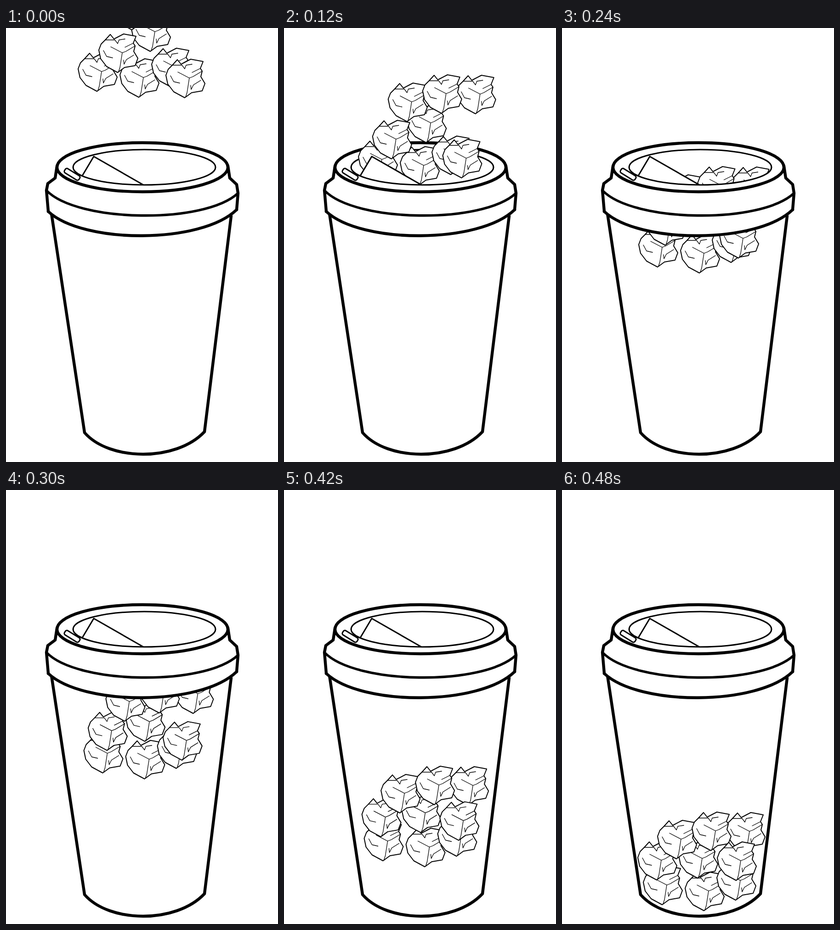
An HTML page for the animation above (510 ms loop, 592 px wide and 946 px high).

```html
<!DOCTYPE html>
<html lang="en">
<head>
<meta charset="utf-8">
<title>Paper balls falling into a cup</title>
<style>
html, body { margin: 0; width: 100%; height: 100%; overflow: hidden; background: #fff; }
svg { display: block; width: 592px; height: 946px; }
.line { fill: none; stroke: #000; stroke-width: 6.4; stroke-linejoin: round; stroke-linecap: round; }
.mid { stroke-width: 5.4; }
.thin { stroke-width: 3; }
.mask { fill: #fff; }
</style>
</head>
<body>
<svg viewBox="0 0 592 946">
  <defs>
    <g id="ball" stroke="#000" stroke-linejoin="round" stroke-linecap="round">
      <path fill="#fff" stroke-width="2" d="M14 13L25 1 33 11 54 0 81 5 75 20 79 26 76 38 85 53 79 69 56 73 41 84 17 71 4 54 0 35 5 22Z"/>
      <path fill="none" stroke-width="1.3" d="M14 13H35L41 21 44 13 57 11M75 20L57 29M79 26L59 38 51 41 26 28M51 41L46 73 43 82M10 36L17 49 30 52M76 46L60 56 55 66 54 57"/>
    </g>
  </defs>

  <!-- back of the cup and lid -->
  <path class="line" d="M111 303.5A186 53.5 0 0 1 483 303.5"/>
  <path class="line thin" d="M146 303.5A155 38.5 0 0 1 456 303.5"/>
  <path class="line" d="M99 405L171 882C225 944 370 946 432 880L490 410"/>

  <g id="balls"></g>

  <!-- front of the lid hides the balls passing behind it -->
  <path class="mask" d="M111 303.5L107 327 91 339 88 354 92 400C168 471 425 471 502 396L505 360 502 341 487 327 483 303.5H456A155 38.5 0 0 1 146 303.5Z"/>
  <path class="mask" d="M191 280L166 322 225 342H299Z"/>
  <path class="line thin" d="M456 303.5A155 38.5 0 0 1 146 303.5M166 322L191 280 299 342"/>
  <rect class="line thin" x="-18.5" y="-5.5" width="37" height="11" rx="4" transform="translate(144 319) rotate(32)"/>
  <path class="line" d="M483 303.5A186 53.5 0 0 1 111 303.5"/>
  <path class="line" d="M111 301L107 327 91 339 88 354 92 400M483 301L487 327 502 341 505 360 502 396"/>
  <path class="line mid" d="M88 354C155 424 432 428 505 360"/>
  <path class="line" d="M92 400C168 471 425 471 502 396"/>
</svg>
<script>
const STEP = 30, STEPS = 17;

// Balls of a group fall together and come to rest at these points; back to front.
const groups = [
  { drift: 20, fall: 766, rest: [[177, 820], [268, 833], [337, 810]] },
  { drift: -19, fall: 795, rest: [[254, 762]] },
  { drift: -37, fall: 753, rest: [[165, 766]] },
  { drift: -25, fall: 800, rest: [[208, 720], [357, 703], [283, 702]] },
  { drift: -10, fall: 699, rest: [[338, 767]] }
];

const layer = document.getElementById('balls');
const balls = groups.flatMap(({ drift, fall, rest }) => rest.map(([x, y]) => {
  const el = document.createElementNS('http://www.w3.org/2000/svg', 'use');
  el.setAttribute('href', '#ball');
  layer.append(el);
  return { el, x, y, drift, fall };
}));

function draw(ms) {
  const left = 1 - Math.floor(ms / STEP) % STEPS / (STEPS - 1);
  for (const { el, x, y, drift, fall } of balls) {
    el.setAttribute('transform', `translate(${x - drift * left} ${y - fall * left})`);
  }
}

const start = performance.now();
function tick(now) {
  draw(Math.max(0, now - start));
  requestAnimationFrame(tick);
}
draw(0);
requestAnimationFrame(tick);
</script>
</body>
</html>
```
